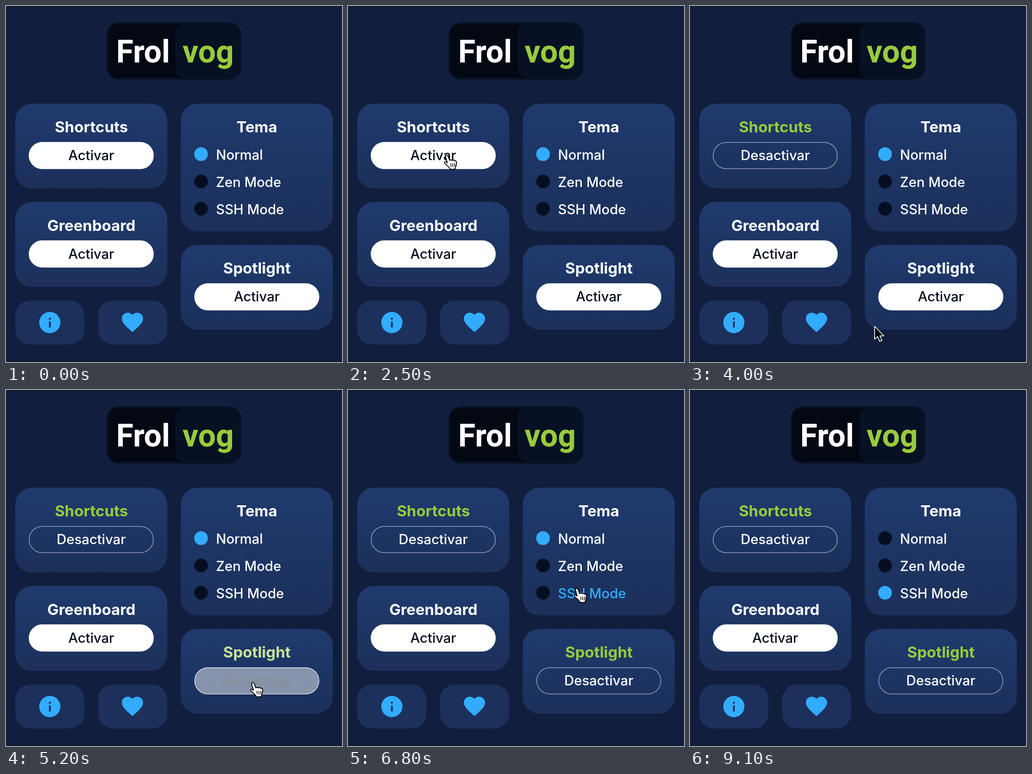
An HTML page that plays this animation: 728x769 px, repeating every 9200 ms.

```html
<!DOCTYPE html>
<html lang="es">
<meta charset="utf-8">
<style>
  html, body { margin: 0; width: 100%; height: 100%; overflow: hidden; background: #121e3d; }
  svg { display: block; width: 728px; height: 769px; cursor: default; }
  text { font-family: Inter, sans-serif; font-size: 29.3px; font-weight: 500; fill: #fff; user-select: none; }
  .title { font-size: 33px; font-weight: 700; text-anchor: middle; }
  .label { text-anchor: middle; }
  .logo { font: 700 68px Roboto, sans-serif; text-anchor: middle; }
</style>
<svg id="stage" viewBox="0 0 728 769">
  <defs>
    <linearGradient id="card" x2="0" y2="1">
      <stop stop-color="#213a6e"/><stop offset=".5" stop-color="#1d3564"/><stop offset="1" stop-color="#1c305a"/>
    </linearGradient>
  </defs>
  <rect x="218" y="35" width="292" height="124" rx="26" fill="#071123"/>
  <path d="M244 39H383Q367 43 367 61V133Q367 151 383 155H244Q222 155 222 133V61Q222 39 244 39Z" fill="#030813"/>
  <text class="logo" x="297" y="121.500">Frol</text>
  <text class="logo" x="438" y="121.500" style="fill:#97cb3c">vog</text>
  <g id="cards"></g>
  <g fill="#32acff">
    <circle cx="95" cy="683.700" r="23"/>
    <path transform="translate(246.400 655.500) scale(2.300)" d="M12 21.350l-1.450-1.320C5.400 15.360 2 12.280 2 8.500 2 5.420 4.420 3 7.500 3c1.740 0 3.410.81 4.500 2.090C13.090 3.810 14.760 3 16.500 3 19.580 3 22 5.420 22 8.500c0 3.780-3.400 6.860-8.550 11.540z"/>
  </g>
  <circle cx="95" cy="675.500" r="2.300" fill="#1c305b"/>
  <path d="M95 683V693" stroke="#1c305b" stroke-width="4" stroke-linecap="round"/>
  <g id="cursor" stroke-linejoin="round">
    <path id="arrow" d="M0 0V28L6.500 22L11 32.500L16 30.500L11.500 20.500H20Z" stroke="#fff" stroke-width="1.700"/>
    <g id="hand" transform="translate(-1 -1) scale(1.060)">
      <path d="M-3 0C-1-3 2-2 3 1L6 9C8 7 10 8 11 9C13 8 15 8 16 10C18 9 20 11 20 13L19 20C18 23 17 24 17 27H7C5 22 0 19-4 15C-6 12-3 10 0 13L1 14Z" fill="#fff" stroke="#000" stroke-width="1.800"/>
      <path d="M8 15L9 22M12 15L12.500 22M16 15V22" fill="none" stroke="#000" stroke-width="1.400"/>
    </g>
  </g>
</svg>
<script>
const LOOP = 9200, STEP = 100, FADE = 300;
const WHITE = [255, 255, 255], GREEN = [151, 203, 60], BLUE = [50, 172, 255], DARK = [5, 14, 32];
const $ = id => document.getElementById(id);

function add(tag, attrs, text = '') {
  const el = document.createElementNS('http://www.w3.org/2000/svg', tag);
  for (const key in attrs) el.setAttribute(key, attrs[key]);
  el.textContent = text;
  return $('cards').appendChild(el);
}

const card = (x, y, width, height, rx, fill) => add('rect', { x, y, width, height, rx, fill });

function switchCard(name, x, y, click) {
  card(x, y, 329.4, 183.2, 36, 'url(#card)');
  return {
    x: x + 29, y: y + 83, click,
    title: add('text', { class: 'title', x: x + 165, y: y + 62 }, name),
    pill: add('rect', { x: x + 30.2, y: y + 83.6, width: 269, height: 56.8, rx: 28.4, 'stroke-width': 1.8 }),
    label: add('text', { class: 'label', x: x + 164.7, y: y + 122 })
  };
}

const switches = [
  switchCard('Shortcuts', 20, 211, 2700),
  switchCard('Greenboard', 20, 423.6, Infinity),
  switchCard('Spotlight', 378.7, 516.2, 5100)
];

card(378.7, 211, 329.4, 276, 36, 'url(#card)');
add('text', { class: 'title', x: 543.4, y: 273 }, 'Tema');
const themes = ['Normal', 'Zen Mode', 'SSH Mode'].map((name, i) => ({
  y: 291 + 59 * i,
  dot: add('circle', { cx: 422.6, cy: 320 + 59 * i, r: 14.8 }),
  label: add('text', { x: 455, y: 332 + 59 * i }, name)
}));
for (const x of [20, 199.6]) card(x, 636.2, 149.8, 95, 32, '#1c305b');

// Pointer stops: time, x, y
const stops = [
  [1100, 420, 430], [1900, 252, 397], [2500, 215, 325], [2700, 215, 325], [2900, 227, 350],
  [4000, 400, 692], [4700, 537, 638], [5200, 536, 635], [5600, 536, 635],
  [6100, 506, 426], [7600, 485, 438], [7900, 485, 438], [8700, 380, -40]
];

function pointer(t) {
  const i = stops.findIndex(stop => stop[0] > t);
  if (i < 1) return null;
  const [t0, x0, y0] = stops[i - 1], [t1, x1, y1] = stops[i];
  const u = (t - t0) / (t1 - t0), k = u * u * (3 - 2 * u);
  return { x: x0 + (x1 - x0) * k, y: y0 + (y1 - y0) * k };
}

const inside = (p, x, y, w, h) => p && p.x > x && p.x < x + w && p.y > y && p.y < y + h;
const onTheme = (p, theme) => inside(p, 408, theme.y, 200, 59);
const onSwitch = (p, s) => inside(p, s.x, s.y, 271, 55);
const fade = (t, start) => 1 - (1 - Math.min(1, Math.max(0, (t - start) / FADE))) ** 1.85;
const mix = (a, b, k) => `rgb(${a.map((v, i) => Math.round(v + (b[i] - v) * k))})`;

function draw(t) {
  for (const s of switches) {
    const k = fade(t, s.click);
    s.title.style.fill = mix(WHITE, GREEN, k);
    s.label.textContent = t < s.click ? 'Activar' : 'Desactivar';
    s.label.style.fill = mix(DARK, WHITE, k);
    s.pill.setAttribute('fill', `rgba(255,255,255,${1 - k})`);
    s.pill.setAttribute('stroke', `rgba(255,255,255,${1 - .54 * k})`);
  }

  const chosen = fade(t, 7900), lagged = pointer(t - 150);
  themes.forEach((theme, i) => {
    theme.dot.setAttribute('fill', mix(DARK, BLUE, [1 - chosen, 0, chosen][i]));
    theme.label.style.fill = mix(WHITE, BLUE, onTheme(lagged, theme) ? 1 : 0);
  });

  const p = pointer(t);
  $('cursor').style.display = p ? '' : 'none';
  if (!p) return;
  const hand = switches.some(s => onSwitch(p, s)) || themes.some(theme => onTheme(p, theme));
  $('hand').style.display = hand ? '' : 'none';
  $('arrow').style.display = hand ? 'none' : '';
  $('cursor').setAttribute('transform', `translate(${p.x} ${p.y})`);
}

function tick() {
  draw(Math.floor(performance.now() % LOOP / STEP) * STEP);
  requestAnimationFrame(tick);
}
tick();
</script>
</html>
```
